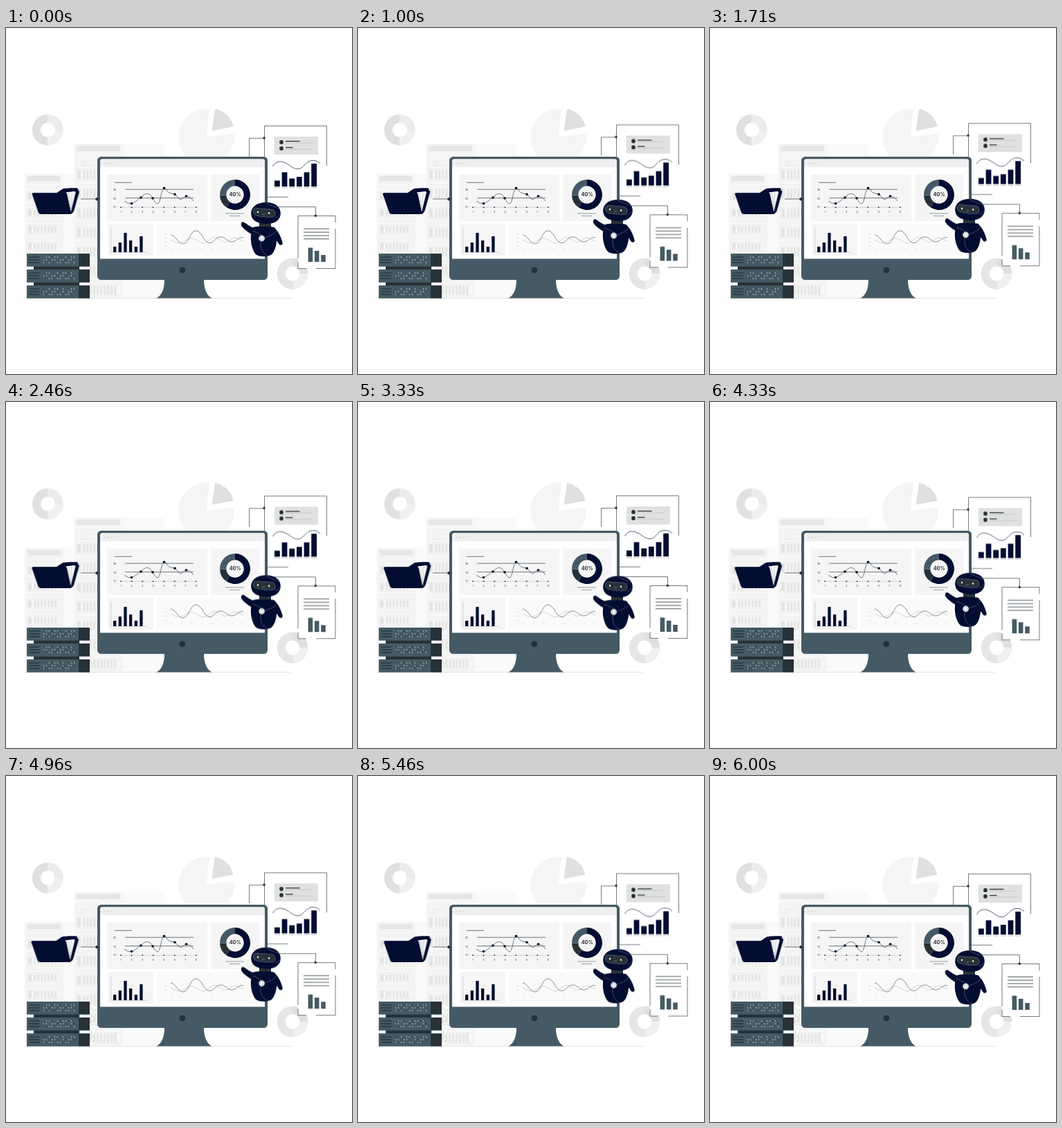
Animation of 500 by 500 pixels, one loop 6040 ms. Source, as an HTML page:

```html
<!DOCTYPE html>
<html lang="en">
<head>
<meta charset="utf-8">
<title>Data dashboard</title>
<style>
  html, body { margin: 0; width: 100%; height: 100%; overflow: hidden; background: #fff; }
  svg { display: block; width: 100vw; height: 100vh; }
  .navy { fill: #020d31; }
  .slate { fill: #455a64; }
  .dark { fill: #263238; }
  .thin { fill: none; stroke: #263238; stroke-width: .65; }
  .soft { fill: none; stroke: #aeb4b7; stroke-width: .55; }
  .seam { fill: none; stroke: #7d88a2; stroke-width: .5; }
  .panel { fill: #f5f5f5; }
  text { font-family: Inter, "Open Sans", sans-serif; fill: #263238; text-anchor: middle; }
  .tiny { font-size: 3.4px; }

  #reports, #robot, #folder { animation: rise 3020ms cubic-bezier(.333,0,.667,1) infinite alternate; }
  #robot { animation-name: hover; animation-duration: 1510ms; }
  #folder { animation-name: sway; animation-duration: 1510ms; animation-delay: -210ms; }
  @keyframes rise { to { transform: translateY(-6.2px); } }
  @keyframes hover { to { transform: translateY(-5.4px); } }
  @keyframes sway { from { transform: translateX(.8px); } to { transform: translateX(-1.2px); } }
</style>
</head>
<body>
<svg viewBox="0 0 500 500">
  <!-- Backdrop -->
  <g id="racks"></g>
  <path d="M27 390.4H412" stroke="#d5d5d5" stroke-width=".7"/>
  <g id="rings"></g>
  <path d="M289.5 157.2L294 116.8A40.5 40.5 0 1 0 329.8 152.5Z" fill="#f5f5f5"/>
  <path d="M297.5 148.5L302 117A32 32 0 0 1 328.5 142.5Z" fill="#e0e0e0"/>

  <!-- Floating reports -->
  <g id="reports">
    <path class="thin" d="M351.5 186V159.4H373M408 244.3H373.5V141.6H463.5V199"/>
    <circle class="dark" cx="373" cy="159" r="1.8"/>
    <path fill="#e0e0e0" d="M388 157h63v26h-63z"/>
    <g class="dark">
      <circle cx="398" cy="165" r="2.9"/>
      <circle cx="398" cy="174" r="2.9"/>
      <path d="M404 163h20.5v1.2H404zM404 172h10.5v1.2H404z"/>
    </g>
    <path class="soft" d="M404 166H443M404 175.2H443"/>
    <path class="thin" style="stroke:#020d31" d="M385.5 200C389 193 396 191 404 195C412 199 416 205 424 203.5C431 201 434 192 442 191.5C448 191 451 193 454 196"/>
    <g id="growth" class="navy"></g>
    <path d="M388 231H450" fill="none" stroke="#8c9498" stroke-width=".6" stroke-dasharray="8 2.6"/>

    <path class="thin" d="M378 258.5H447.5V271"/>
    <path fill="#fff" d="M422 271.5h54v76h-54z"/>
    <path class="thin" d="M422 333V271.5H476V281M476 290V347.5H448M422 338V347.5H434"/>
    <circle class="dark" cx="447.3" cy="271.3" r="1.8"/>
    <path class="thin" style="stroke-width:.8" d="M430 290.2H467M430 295.1H467M430 300H467M430 304.8H467"/>
    <g id="decline" class="slate"></g>
  </g>

  <!-- Monitor -->
  <path class="slate" d="M229 362V364C229 378 224 388 217 390.5H298C291 388 286 378 286 364V362Z"/>
  <rect class="slate" x="132" y="186" width="246" height="178" rx="5.5"/>
  <path fill="#fff" d="M136 333.5V192.5q0-3 3-3H371q3 0 3 3V333.5z"/>
  <path fill="#efefef" d="M136 201V192.5q0-3 3-3H371q3 0 3 3V201z"/>
  <g fill="#d8d8d8"><circle cx="143" cy="195.5" r="1.3"/><circle cx="148" cy="195.5" r="1.3"/><circle cx="153" cy="195.5" r="1.3"/></g>
  <circle class="dark" cx="254.8" cy="349.8" r="4.4"/>

  <g class="panel">
    <rect x="146" y="212" width="145" height="67"/>
    <rect x="296" y="212" width="70" height="67"/>
    <rect x="147" y="283" width="66" height="46"/>
    <rect x="218" y="283" width="148" height="45" fill="#fafafa"/>
  </g>

  <!-- Line chart -->
  <path class="thin" d="M157 223.3H182M172 233.2H271M172 245.7H271"/>
  <path class="soft" d="M166 259.2H275"/>
  <path class="thin" d="M171 250C175 253 178 254.5 181.5 253.5C188 252 190 247 195 245C201 238 207 237 212 246C219 258 221 256 224 242C226 232 229 229 232 234C236 241 240 238 244 240.5C249 243 249 249 253 247.5C257 246 258 242.5 261 243C266 243 268 247 271 250"/>
  <g id="points" class="navy"></g>
  <g id="ticks"></g>

  <!-- Share ring -->
  <g id="share"></g>
  <text x="331.2" y="243.2" font-size="7.1" font-weight="700">40%</text>
  <path d="M317 268H344M323 271.6H338" stroke="#8a9296" stroke-width=".9"/>

  <!-- Bar chart -->
  <path class="soft" d="M151.7 289V324.3H204"/>
  <g id="bars" class="navy"></g>

  <!-- Wave chart -->
  <g id="faint" fill="#dcdcdc"></g>
  <path class="soft" d="M238 306C246 311 252 312 258 308C265 303 270 303 276 307C284 313 289 311 295 305C301 300 307 304 312 308C320 313 325 303 331 303C336 303 339 307 343 308"/>
  <path class="thin" style="stroke:#455a64" d="M238 299C246 300 249 313 256 312C265 311 266 293 274 293C283 293 284 306 292 310C299 313 302 303 309 302C317 301 320 310 327 309C334 308 337 301 343 303"/>

  <!-- Foreground servers -->
  <path d="M108 247H131" class="thin"/>
  <circle class="dark" cx="131.5" cy="247.3" r="2.2"/>
  <path class="dark" d="M40 344h66v6h-66zM40 367h66v6h-66z"/>
  <g id="servers"></g>

  <g id="folder">
    <path class="navy" d="M48 267L73 238L79.5 233.5Q81.5 231.9 84.5 231.8L93 231.2H101Q103.5 231.2 103.6 234.5Q105.5 235 105 237.5L97.5 264Q96 268.8 91 268.8Z"/>
    <path fill="#f7f7f7" d="M86 237.6L98 236L100 237L93 266Z"/>
    <path class="soft" d="M90 238L93 262M94.5 237.5L93.5 262"/>
    <path class="navy" d="M38.5 238.2H85Q87 238.2 87.500 240L93.500 269H50Q47 269 46 266.500L37 240.500Q36.500 238.200 38.500 238.200Z"/>
  </g>

  <g id="robot">
    <path class="navy" d="M358 300C351 296 344 291 341 287C338 282.500 341 278.500 344.500 281C350 285.500 357 288.500 361 290.500Z"/>
    <path class="navy" d="M386 288.500C393 290.500 398 303.500 399.800 311C399.500 314.500 395.500 314.500 394 311.500L386 300Z"/>
    <path class="navy" d="M357 288C364 285.500 382 285.500 388.500 288.500C394 300 391 321 383.500 327.500C377 331 367 331 361.500 327.500C354 320 351 300 357 288Z"/>
    <path class="seam" d="M356 293C365 296 366 298 369 299M374 303C382 301 388 297 391 293M368 309C367 319 371 325 377 329"/>
    <path class="dark" d="M366 281h17v6h-17z"/>
    <g transform="translate(0 -.7)">
      <path class="navy" d="M354.200 269C354 258 364 252.600 376 252.600C389 252.600 397 259 396.800 269C396.600 278 389 284 376 283.800C363 283.500 354.500 279 354.200 269Z"/>
      <path class="seam" d="M374 253C382 257 390 260 396.500 262M389 275C393 274 395 272 396.500 269"/>
      <path class="seam" style="fill:#263238" d="M361 261C369 262 378 262 385 263C390 264 391 274 385 274C376 274.500 368 273.500 361 271.500C356 270 356 261 361 261Z"/>
      <g fill="#fffbe6"><circle cx="364" cy="266.600" r="1.250"/><circle cx="380" cy="268.200" r="1.250"/></g>
      <path class="soft" d="M370 269.500q2 1 4 .300"/>
    </g>
    <circle cx="369.600" cy="304" r="4.300" fill="#f3f3f3" stroke="#8b949b" stroke-width=".8"/>
    <circle cx="369.600" cy="304" r="2.300" fill="#fff" stroke="#a9b0b5" stroke-width=".7"/>
  </g>
</svg>
<script>
const $ = id => document.getElementById(id);
const add = (id, html) => $(id).insertAdjacentHTML('beforeend', html);
const rect = (x, y, w, h, fill) =>
  `<rect x="${x}" y="${y}" width="${w}" height="${h}"${fill ? ` fill="${fill}"` : ''}/>`;
const dot = (x, y, r, fill) =>
  `<circle cx="${x}" cy="${y}" r="${r}"${fill ? ` fill="${fill}"` : ''}/>`;

// Angles in degrees, clockwise from the top
function arc(cx, cy, outer, inner, from, to, color) {
  const at = (r, a) => `${cx + r * Math.sin(a * Math.PI / 180)} ${cy - r * Math.cos(a * Math.PI / 180)}`;
  const big = to - from > 180 ? 1 : 0;
  return `<path fill="${color}" d="M${at(outer, from)}A${outer} ${outer} 0 ${big} 1 ${at(outer, to)}` +
    `L${at(inner, to)}A${inner} ${inner} 0 ${big} 0 ${at(inner, from)}Z"/>`;
}

function columns(id, x, step, width, base, tops) {
  add(id, tops.map((top, i) => rect(x + i * step, top, width, base - top)).join(''));
}

columns('growth', 388, 10.65, 7.8, 229.2, [220.5, 208.5, 217.5, 215, 208.5, 196]);
columns('decline', 436.6, 9.3, 6.6, 338, [317.5, 322, 328]);
columns('bars', 155, 7.65, 4.3, 324, [316, 310, 296, 307, 316, 301]);

add('rings',
  arc(60.3, 147.3, 22.5, 10.5, 180, 360, '#e0e0e0') +
  arc(60.3, 147.3, 22.5, 10.5, 0, 95, '#ebebeb') +
  arc(60.3, 147.3, 22.5, 10.5, 95, 180, '#f0f0f0') +
  arc(414, 355, 22.5, 10.5, 175, 360, '#e6e6e6') +
  arc(414, 355, 22.5, 10.5, 0, 90, '#e0e0e0') +
  arc(414, 355, 22.5, 10.5, 90, 175, '#f0f0f0'));

add('share',
  arc(331, 241, 22, 12.7, 0, 215, '#020d31') +
  arc(331, 241, 22, 12.7, 215, 268, '#263238') +
  arc(331, 241, 22, 12.7, 268, 360, '#455a64'));

[[181.5, 253.5], [195, 245], [212, 246], [228.5, 231.3], [244, 240.3], [260.5, 243]]
  .forEach(([x, y]) => add('points', dot(x, y, 1.8)));

['30', '20', '10'].forEach((label, i) =>
  add('ticks', `<text class="tiny" x="157" y="${234.7 + i * 12.8}">${label}</text>`));
for (let i = 0; i < 8; i++) {
  const x = 166 + i * 15.55;
  add('ticks', dot(x, 259.2, .9, '#263238') + `<text class="tiny" x="${x}" y="267">${i + 1}</text>`);
}

for (let i = 0; i < 4; i++) add('faint', rect(229, 297 + i * 6, 3.5, .8));
for (let i = 0; i < 8; i++) add('faint', rect(238 + i * 14.5, 319.5, 3, .8));

// Pale rack units with vertical vents
function rack(x, y, front, side, first, step, count, height) {
  const w = front - 9;
  add('racks', rect(x, y, front, 390 - y, '#f6f6f6') + rect(x + front, y, side, 390 - y, '#fafafa') +
    rect(x + 4, y + 3, w, 8, '#e6e6e6'));
  for (let i = 0; i < count; i++) {
    const top = first + i * step;
    let unit = rect(x + 3, top, w + 2, height, '#ececec') + rect(x + 4, top + 1, w, height - 2, '#f7f7f7') +
      rect(x + 5, top + 2, 5, height - 4, '#e4e4e4') + rect(x + 3, top - 5, w + 2, .7, '#ebebeb');
    for (let v = 13; v < w; v += 5) unit += rect(x + v, top + 2, 3.4, height - 4, '#e6e6e6');
    add('racks', unit);
  }
}
rack(27, 210.5, 57, 15, 236, 24.2, 4, 14);
rack(98, 167, 72, 58, 203, 27.9, 7, 17);
add('racks', '<path d="M101 185H134M101 191H134M30 224H80M30 229H80" stroke="#ececec" stroke-width=".7"/>' +
  '<circle cx="112" cy="196" r="3.5" fill="none" stroke="#e9e9e9"/>');

for (let i = 0; i < 3; i++) {
  const y = 326 + i * 23;
  let unit = rect(30, y, 75, 18.7, '#455a64') + rect(105, y, 16, 18.7, '#263238');
  for (let row = 0; row < 3; row++) {
    const line = y + 5 + row * 4;
    unit += rect(33, line - .7, 15.5, 1.4, '#263238');
    for (let n = 0; n < 12; n++) {
      if ((n * 5 + row * 3 + i) % 7) unit += dot(54.5 + n * 4, line, .75, (n + row) % 3 ? '#d3dade' : '#263238');
    }
  }
  add('servers', unit);
}
</script>
</body>
</html>
```
